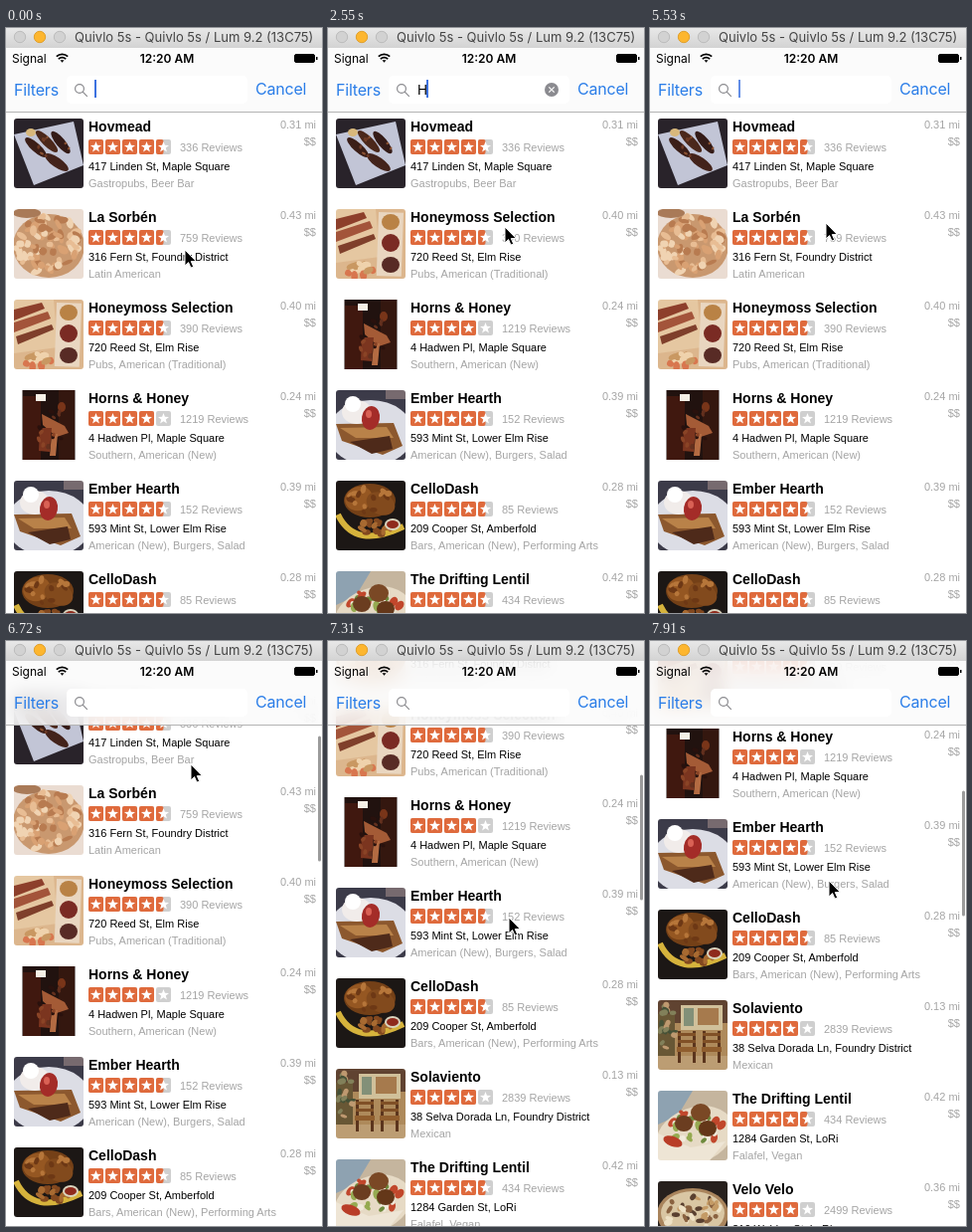
An HTML page for the animation above (8 s loop, 318x588 px).

```html
<!DOCTYPE html>
<html lang="en">
<head>
<meta charset="utf-8">
<title>Restaurant search</title>
<style>
  html, body { margin: 0; width: 318px; height: 588px; overflow: hidden; background: #fff; }
  svg { position: absolute; left: 0; top: 0; }
  text { font: 11px "Liberation Sans", Arial, sans-serif; white-space: pre; }
  .name { font-size: 14px; font-weight: bold; }
  .grey { fill: #a5a5a5; }
  .end { text-anchor: end; }
  .soft { filter: blur(.6px); }
  .ui { font-family: Inter, Roboto, sans-serif; font-size: 12px; }
  .link { font-size: 16px; letter-spacing: -.2px; fill: #2a7de8; }
  .query { font-size: 13.5px; letter-spacing: -.3px; }
  #nav {
    position: absolute; left: 0; top: 20px; width: 318px; height: 64px;
    background: rgba(251, 251, 251, .84); backdrop-filter: blur(9px);
    border-bottom: 1px solid #b4b4b4;
  }
</style>
</head>
<body>
<svg width="318" height="588">
  <defs>
    <clipPath id="wide"><rect width="70" height="70" rx="3"/></clipPath>
    <clipPath id="tall"><rect x="8.5" width="53" height="70"/></clipPath>
  </defs>
  <g id="list"></g>
  <rect id="bar" x="314" width="3" height="126" rx="1.5" fill="#9b9b9b"/>
</svg>
<div id="nav"></div>
<svg width="318" height="588">
  <defs>
    <linearGradient id="chrome" x2="0" y2="1">
      <stop stop-color="#e8e8e8"/><stop offset="1" stop-color="#d3d3d3"/>
    </linearGradient>
  </defs>
  <rect width="318" height="20" fill="url(#chrome)"/>
  <g stroke="#bcbcbc" fill="#d2d2d2">
    <circle cx="14" cy="9" r="5.7"/>
    <circle cx="54" cy="9" r="5.7"/>
    <circle cx="34" cy="9" r="5.7" fill="#fdb62f" stroke="#e0a02c"/>
  </g>
  <text class="ui" x="69" y="14" style="font-size:13px" fill="#444">Quivlo 5s - Quivlo 5s / Lum 9.2 (13C75)</text>
  <text class="ui" x="6" y="35">Signal</text>
  <g fill="none" stroke="#000" stroke-width="1.7">
    <path d="M50.8 28.7a8 8 0 0 1 11.4 0M52.8 31.2a5 5 0 0 1 7.4 0"/>
    <path d="M54.5 32.3h4l-2 2.4z" fill="#000" stroke="none"/>
  </g>
  <text class="ui" x="162" y="35" text-anchor="middle" font-weight="600" style="font-weight:600">12:20 AM</text>
  <rect x="290.5" y="26.5" width="20" height="8" rx="1.5" stroke="#000"/>
  <rect x="312" y="29" width="1.5" height="3"/>
  <rect x="61" y="48" width="182" height="28" rx="5" fill="#fff"/>
  <text class="ui link" x="8" y="68">Filters</text>
  <text class="ui link" x="251" y="67">Cancel</text>
  <g fill="none" stroke="#8a8a8e" stroke-width="1.2">
    <circle cx="74" cy="61" r="4.4"/><path d="M77.2 64.2l4.6 4.6"/>
  </g>
  <text class="ui query" id="query" x="90" y="67"></text>
  <rect id="caret" y="52" width="2" height="18" fill="#3d72e0"/>
  <g id="clear">
    <circle cx="225" cy="62" r="7" fill="#8b8b90"/>
    <path d="M222.3 59.3l5.4 5.4m0-5.4l-5.4 5.4" stroke="#fff" stroke-width="1.2"/>
  </g>
  <path id="mouse" d="M0 0V16l3.6-3.4 2.4 5.5 2.7-1.1-2.4-5.4h5.1z" stroke="#fff"/>
</svg>
<script>
const $ = id => document.getElementById(id);

const oval = (x, y, rx, ry, fill, turn = 0) =>
  `<ellipse cx="${x}" cy="${y}" rx="${rx}" ry="${ry}" fill="${fill}" transform="rotate(${turn} ${x} ${y})"/>`;
const box = (x, y, w, h, fill, turn = 0) =>
  `<rect x="${x}" y="${y}" width="${w}" height="${h}" fill="${fill}" transform="rotate(${turn} ${x} ${y})"/>`;
const poly = (points, fill) => `<polygon points="${points}" fill="${fill}"/>`;
const back = fill => box(-6, -6, 82, 82, fill);

let seed = 7;
const random = () => (seed = seed * 16807 % 2147483647) / 2147483647;

// Scatters small ovals over an elliptic area.
function bits(n, x, y, rx, ry, size, ...fills) {
  let out = '';
  for (let i = 0; i < n; i++) {
    const a = random() * 6.283, d = Math.sqrt(random());
    out += oval(x + rx * d * Math.cos(a), y + ry * d * Math.sin(a),
      size * (.6 + random() * .6), size * (.4 + random() * .4), fills[i % fills.length], random() * 180);
  }
  return out;
}

const photos = [
  back('#29232a') + poly('0,16 60,3 70,47 20,67', '#c2c5d6') + oval(17, 14, 5, 4, '#d8b87c') +
    oval(22, 29, 4.5, 14, '#3b1e17', -48) + oval(33, 23, 4.5, 15, '#4b281b', -45) +
    oval(47, 24, 4.5, 14, '#341b17', -40) + oval(43, 44, 5, 14, '#43231b', -55) +
    bits(9, 36, 30, 20, 12, 2, '#8c5232', '#6d3a25'),
  back('#eadcd2') + oval(35, 37, 36, 32, '#c9986f') +
    bits(75, 35, 36, 33, 29, 5, '#f0d3b2', '#d9a173', '#e8bd94', '#b87b50') + oval(13, 4, 14, 5, '#a97a58'),
  back('#dcb68d') + poly('0,0 40,0 44,48 0,54', '#e5c7a1') + poly('0,10 28,3 31,9 0,21', '#8d3f2b') +
    poly('0,23 34,12 37,19 0,33', '#a3543a') + poly('2,37 38,25 40,30 4,45', '#7f3f2b') +
    box(43, 3, 25, 64, '#e9d6c0', 2) + oval(55, 13, 9, 8, '#b98245') + oval(55, 34, 9, 9, '#7a2b24') +
    oval(55, 56, 9, 8, '#582b25') + bits(12, 19, 61, 18, 7, 5, '#d8764f', '#efd2ac', '#c99862'),
  back('#21120f') + box(9, 6, 18, 64, '#40180f') + box(45, 0, 16, 70, '#34170f') +
    box(22, 4, 10, 7, '#f5f0e6') + oval(48, 17, 4, 5, '#793519') +
    poly('28,24 51,36 55,43 43,47 29,35', '#a45b36') + poly('26,38 38,38 36,62 25,61', '#7b351f') +
    poly('38,44 44,44 42,66 36,66', '#b36b42') + bits(12, 35, 38, 18, 24, 3, '#63301e', '#8a4426', '#29110d'),
  back('#3c3b49') + oval(35, 43, 43, 33, '#dcdde5') + poly('0,34 58,33 67,56 47,65 6,51', '#8c582e') +
    poly('4,38 51,37 58,48 20,48', '#b98249') + poly('14,52 54,46 57,59 36,64', '#4e2a1a') +
    oval(21, 22, 15, 12, '#f1ecea') + oval(17, 14, 8, 8, '#fff') + oval(35, 28, 9, 12, '#a42c28', 10) +
    oval(33, 24, 3, 4, '#d96155') + box(50, 0, 20, 9, '#776a6f'),
  back('#1c1715') + oval(34, 20, 26, 17, '#744017') + oval(23, 18, 14, 12, '#955722', -20) +
    oval(45, 23, 15, 11, '#824a1d', 25) + bits(15, 34, 20, 24, 12, 4, '#b6763a', '#6d3815') +
    '<path d="M2 34Q19 70 68 46" fill="none" stroke="#d6b33c" stroke-width="6"/>' +
    bits(15, 39, 47, 18, 7, 5, '#82481f', '#a86a31') + oval(57, 44, 8, 6, '#d9d3bd') + oval(57, 44, 6, 4, '#8f2a1c'),
  back('#ae8a5b') + box(0, 0, 70, 23, '#604331') + box(23, 5, 42, 25, '#d0c09a') + box(26, 8, 10, 18, '#829078') +
    box(40, 8, 21, 17, '#a67a4d') + box(0, 14, 17, 56, '#685735') + bits(18, 9, 28, 9, 24, 4, '#455137', '#82805a', '#be9970') +
    box(0, 56, 70, 14, '#bc9d73') + [20, 45].map(x => box(x, 31, 3, 32, '#5b351d') + box(x + 15, 31, 3, 32, '#5b351d') +
    box(x, 33, 18, 3, '#805026') + box(x, 40, 18, 3, '#805026') + box(x - 1, 47, 20, 5, '#905e2e')).join(''),
  back('#c5b59e') + poly('0,0 35,0 20,25 0,34', '#8ea2b1') + oval(37, 45, 40, 28, '#e6dac5', -20) +
    bits(28, 38, 38, 28, 18, 5, '#6d8a3d', '#c1472c', '#f0eadb', '#95aa51') + oval(26, 33, 9, 8, '#6b3d20') +
    oval(43, 22, 10, 9, '#7a4825') + oval(50, 38, 9, 8, '#643719') + poly('0,43 33,57 68,51 48,75 0,75', '#eee5d5') +
    oval(15, 51, 10, 5, '#b93d27', 20),
  back('#27201d') + oval(35, 33, 36, 26, '#a9845c') + oval(35, 32, 32, 22, '#d9c6a3') +
    bits(35, 35, 32, 29, 19, 4, '#eee1c5', '#8a6240', '#c49b66', '#5a4030')
];

const places = [
  ['Hovmead', 4.5, 336, '417 Linden St, Maple Square', 'Gastropubs, Beer Bar', '0.31'],
  ['La Sorbén', 4.5, 759, '316 Fern St, Foundry District', 'Latin American', '0.43'],
  ['Honeymoss Selection', 4.5, 390, '720 Reed St, Elm Rise', 'Pubs, American (Traditional)', '0.40'],
  ['Horns & Honey', 4, 1219, '4 Hadwen Pl, Maple Square', 'Southern, American (New)', '0.24'],
  ['Ember Hearth', 4.5, 152, '593 Mint St, Lower Elm Rise', 'American (New), Burgers, Salad', '0.39'],
  ['CelloDash', 4.5, 85, '209 Cooper St, Amberfold', 'Bars, American (New), Performing Arts', '0.28'],
  ['Solaviento', 4, 2839, '38 Selva Dorada Ln, Foundry District', 'Mexican', '0.13'],
  ['The Drifting Lentil', 4.5, 434, '1284 Garden St, LoRi', 'Falafel, Vegan', '0.42'],
  ['Velo Velo', 4, 2499, '310 Walden St, LoRi', 'Italian, Pizza', '0.36']
];

const starPoints = Array.from({ length: 10 }, (_, i) => {
  const a = i * Math.PI / 5, r = i % 2 ? 2.4 : 5.8;
  return [7.5 + r * Math.sin(a), 7.8 - r * Math.cos(a)].map(v => v.toFixed(2));
}).join(' ');

function stars(rating) {
  let out = '';
  for (let i = 0; i < 5; i++) {
    const part = Math.max(0, Math.min(1, rating - i));
    out += `<g transform="translate(${83 + 17 * i} 21)"><rect width="15" height="15" rx="2" fill="#cfcfcf"/>
      <rect width="${15 * part}" height="15" rx="2" fill="#df6a3c"/>${poly(starPoints, '#fff')}</g>`;
  }
  return out;
}

$('list').innerHTML = places.map(([name, rating, reviews, address, kind, miles], i) => `<g>
  <g transform="translate(8 0)" clip-path="url(#${i === 3 ? 'tall' : 'wide'})"><g class="soft">${photos[i]}</g></g>
  <text class="name" x="83" y="13">${name.replace('&', '&amp;')}</text>${stars(rating)}
  <text class="grey" x="175" y="33">${reviews} Reviews</text>
  <text x="83" y="52">${address}</text>
  <text class="grey" x="83" y="69">${kind}</text>
  <text class="grey end" x="312" y="10">${miles} mi</text>
  <text class="grey end" x="312" y="27">$$</text></g>`).join('');
const rows = [...$('list').children];

// Each track holds [time, value] steps; a value stays until the next one.
const queries = [[0, ''], [1050, 'Ho'], [2550, 'H'], [2840, '']];
const carets = [[0, 1], [150, .6], [300, 0], [750, 1], [1650, .6], [1800, 0], [2100, .5], [2250, 1],
  [3590, .6], [3730, 0], [4030, .5], [4180, 1], [4630, .6], [4780, 0], [5080, .5], [5230, 1],
  [5530, .8], [5680, 0], [6130, 1], [6570, 0]];
const scrolls = [[0, 0], [6570, 8], [6720, 37], [6870, 92], [7020, 142], [7160, 179], [7310, 207],
  [7460, 225], [7610, 237], [7760, 251], [7910, 276]];
const mice = [[0, [180, 223]], [150, [179, 210]], [300, [178, 200]], [1650, [178, 201]], [2100, [178, 200]],
  [2700, [177, 196]], [6570, [183, 158]], [6720, [186, 124]], [6870, [186, 120]], [7020, [184, 175]],
  [7160, [183, 238]], [7310, [182, 278]], [7460, [182, 290]], [7610, [182, 284]], [7760, [181, 264]], [7910, [180, 241]]];
const at = (track, t) => track.findLast(step => step[0] <= t)[1];

const caretX = { '': 89, H: 99, Ho: 107 };

function draw() {
  const t = performance.now() % 8000;
  const query = at(queries, t), scroll = at(scrolls, t);
  let y = 91 - scroll;
  rows.forEach((row, i) => {
    const match = places[i][0].toLowerCase().includes(query.toLowerCase());
    row.style.display = match ? '' : 'none';
    row.setAttribute('transform', `translate(0 ${y})`);
    if (match) y += 91;
  });
  $('query').textContent = query;
  $('clear').style.display = query ? '' : 'none';
  $('caret').setAttribute('x', caretX[query]);
  $('caret').style.opacity = at(carets, t);
  $('bar').setAttribute('y', 87 + scroll * .23);
  $('bar').style.opacity = scroll ? 1 : 0;
  $('mouse').setAttribute('transform', `translate(${at(mice, t)})`);
  requestAnimationFrame(draw);
}
draw();
</script>
</body>
</html>
```
